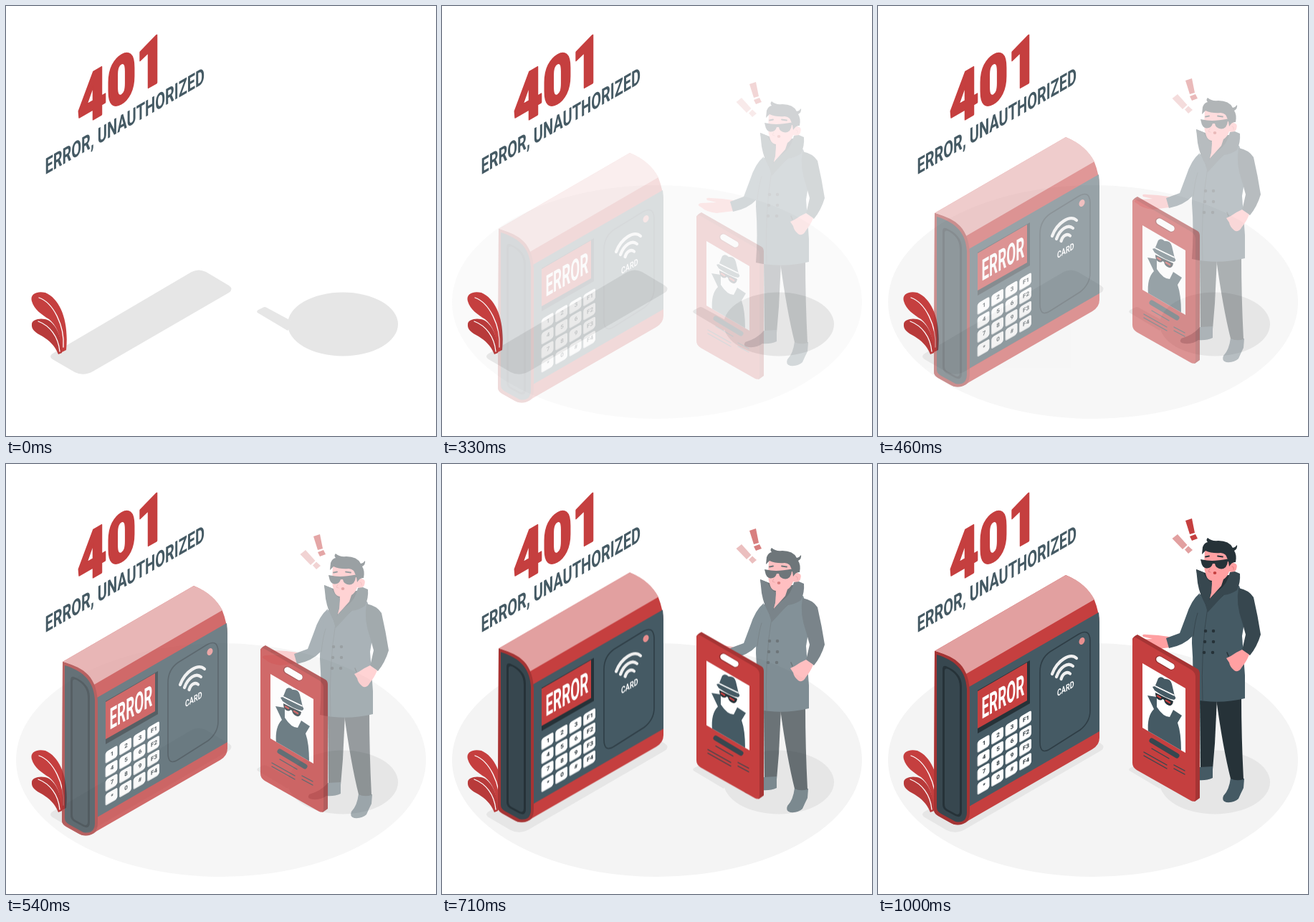
These frames come from a looping animation (600x600 px, 1.04 s). An HTML page without scripts:

```html
<!DOCTYPE html>
<html lang="en">
<head>
<meta charset="utf-8">
<title>401</title>
<style>
html, body { margin: 0; width: 100%; height: 100%; overflow: hidden; background: #fff; }
svg { display: block; width: 100%; height: 100%; }
text { font-family: Roboto, Inter, sans-serif; font-weight: 700; }
.red { fill: #c53f3f; }
.deep { fill: #a53434; }
.pink { fill: #e2a0a0; }
.slate { fill: #455a64; }
.dark { fill: #37474f; }
.ink { fill: #263238; }
.skin { fill: #ffa0a2; }
.white { fill: #fff; }
.shade { fill: #e6e6e6; }
.line { fill: none; stroke-linecap: round; }

/* stepped at 24 drawings a second */
.rise, .man, .floor { animation: rise 1040ms infinite; }
.man { animation-name: man; }
.floor { animation-name: floor; }
@keyframes rise {
  0% { opacity: 0; transform: translateY(60px); animation-timing-function: step-end; }
  16.3% { opacity: .02; transform: translateY(59px); animation-timing-function: steps(2); }
  24% { opacity: .07; transform: translateY(56px); animation-timing-function: steps(2); }
  31.7% { opacity: .18; transform: translateY(50px); animation-timing-function: steps(3); }
  44.2% { opacity: .54; transform: translateY(28px); animation-timing-function: steps(2); }
  51.9% { opacity: .77; transform: translateY(15px); animation-timing-function: steps(2); }
  60.5% { opacity: .95; transform: translateY(3.5px); animation-timing-function: steps(2); }
  68.2% { opacity: 1; transform: translateY(-3.5px); animation-timing-function: steps(3); }
  79.8% { opacity: 1; transform: translateY(-6.5px); animation-timing-function: steps(2); }
  88.4% { opacity: 1; transform: translateY(-4.5px); animation-timing-function: steps(2); }
  96.1%, 100% { opacity: 1; transform: none; }
}
@keyframes man {
  0% { opacity: 0; transform: translateY(40px); animation-timing-function: step-end; }
  16.3% { opacity: .06; transform: translateY(36px); animation-timing-function: steps(4); }
  31.7% { opacity: .21; transform: translateY(30px); animation-timing-function: steps(3); }
  44.2% { opacity: .36; transform: translateY(25px); animation-timing-function: steps(2); }
  51.9% { opacity: .46; transform: translateY(22px); animation-timing-function: steps(2); }
  60.5% { opacity: .56; transform: translateY(18px); animation-timing-function: steps(5); }
  79.8% { opacity: .82; transform: translateY(8px); animation-timing-function: steps(4); }
  96.1%, 100% { opacity: 1; transform: none; }
}
@keyframes floor {
  0% { opacity: 0; animation-timing-function: step-end; }
  16.3% { opacity: .1; animation-timing-function: steps(4); }
  31.7% { opacity: .45; animation-timing-function: steps(3); }
  44.2% { opacity: .75; animation-timing-function: steps(4); }
  60.5%, 100% { opacity: 1; }
}
</style>
</head>
<body>
<svg viewBox="0 0 600 600">
<defs>
  <g id="key">
    <rect x="-9" y="-6.8" width="16" height="15.500" rx="2.500" fill="#d5d9db"/>
    <rect x="-8" y="-7.500" width="16" height="15" rx="2.500" class="white"/>
  </g>
  <g id="row">
    <use href="#key"/><use href="#key" x="19.5"/><use href="#key" x="39"/><use href="#key" x="58.5"/>
  </g>
  <clipPath id="photo"><path d="M369 278L429 313V403L369 368Z"/></clipPath>
</defs>

<ellipse class="floor" cx="300" cy="413" rx="286" ry="163" fill="#f4f4f4"/>
<g class="shade">
  <path d="M259 371Q269 366 279 371L311 390Q318 395 311 400L121 510Q108 517 96 511L65 493Q59 489 65 485Z"/>
  <ellipse cx="470" cy="444" rx="77" ry="44.5"/>
  <path d="M352 424L358 421Q361 419 364 421L401 441L393 453L351 428Q349 426 352 424Z"/>
</g>

<g class="red">
  <text transform="matrix(.76 -.4385 0 1 99.500 171)" font-size="93" style="font-weight:900" stroke="#c53f3f" stroke-width="2.500" stroke-linejoin="round">401</text>
  <path d="M36 412C33 402 43 397 55 400C76 409 88 440 84 480L76 484C78 462 71 446 60 437C50 431 39 423 36 412Z"/>
  <path d="M36 444C36 437 50 434 60 439C73 448 78 466 78 484L73 486C68 473 60 467 51 461C41 456 35 451 36 444Z" fill="#b83a3a"/>
</g>
<g class="line" stroke="#fff" stroke-width="1.3">
  <path d="M46 407C66 414 82 446 80 476"/>
  <path d="M45 440C61 446 73 461 75 482"/>
</g>
<text class="slate" transform="matrix(.646 -.373 0 1 54.5 235.5)" font-size="31" style="font-weight:600">ERROR, UNAUTHORIZED</text>

<g class="man">
  <path class="red" d="M429 79L438 76L442 96L435 98ZM435 101L443 98L446 104L438 107Z"/>
  <path class="pink" d="M410.500 104L418 98L431.500 113L425 119ZM428 119.500L433 114.500L439 120L433 125Z"/>

  <path class="ink" d="M449 326L473 328L470 390L467 426H450Z"/>
  <path class="slate" d="M449 423L467 422V438Q458 442 447 441Q440 447 428 446Q419 445 423 439Q440 434 449 423Z"/>
  <path class="slate" d="M492 438L511 439L510 452Q506 460 503 467Q497 473 486 472Q479 470 482 463Q490 455 492 438Z"/>
  <path class="ink" d="M472 328L507 326Q507 380 510 440Q500 443 492 439Q481 395 472 328Z"/>

  <path class="skin" d="M406 241L391 239L375 238Q367 237 370 241L383 244L361 245Q354 247 362 251Q368 257 383 259L407 256Z"/>
  <path class="slate" d="M449 180Q437 190 430 212L421 236L402 243L406 257Q427 253 439 240L446 222Z"/>
  <path class="slate" d="M449 182L482 174L504 170Q516 200 508 240L512 295V327Q475 336 438 328Q441 290 438 250Q438 208 449 182Z"/>
  <path class="line" d="M460 200Q450 260 453 330M440 240Q442 220 446 208" stroke="#37474f" stroke-width="1"/>
  <g class="line" stroke="#263238" stroke-width="4.500">
    <path d="M457 233h.01M468 233h.01M456 248h.01M468 248h.01M455 263h.01M467 263h.01"/>
  </g>
  <path class="ink" d="M444 147L454 151L466 155H488L505 153L488 178L460 203L450 180Z"/>
  <path class="skin" d="M456 120H490L496 138Q503 139 500 147Q497 153 490 150Q488 157 482 161L479 170L463 188L466 163Q460 162 458 156Q455 148 455 140Z"/>
  <path class="dark" d="M444 147L454 151Q458 161 466 166L465 180L459 199Q449 184 446 166Z"/>
  <path class="dark" d="M491 151L498 150L505 153Q506 165 501 176Q492 182 482 183L460 207L457 197Q466 182 477 175Q488 166 491 151Z"/>
  <path class="ink" d="M452 126L453 116Q455 110 460 109Q457 106 460 103Q465 108 475 107Q490 107 495 117Q499 116 501 113Q502 118 497 121Q501 127 499 137Q494 136 490 143Q489 134 487 131Q486 125 478 124Q466 125 457 121Z"/>
  <path class="ink" d="M450 133L459 134.500Q470 136 488 132.500L496 135V137L488 136Q487 146 479 146.500Q471 146 470 139H467Q465 146 458 145.500Q452 144 451 137Z"/>
  <path class="line" d="M457 129.500L462 128.500M474 128.500L481 129.500" stroke="#263238" stroke-width="1.800"/>
  <ellipse cx="470" cy="152" rx="2.300" ry="1.900" class="red"/>
  <path class="line" d="M494 143Q497 143 496 147M463 146L461 150L464 151" stroke="#e47c80" stroke-width="1"/>

  <path class="dark" d="M503 173Q518 176 524 186Q530 212 534 238Q529 255 519 267L508 260L513 238L508 220Q499 195 503 173Z"/>
  <path class="skin" d="M508 259L518 266Q514 276 508 283Q503 292 497 288Q491 283 490 277L486 271Q493 268 500 263Z"/>
  <path class="line" d="M487 263L489 268" stroke="#263238" stroke-width="1.500"/>
</g>

<g class="rise">
  <!-- terminal -->
  <path class="red" d="M79 261L262 155C282 163 295 176 302 190Q308 205 309 222V382Q309 392 299 398L127 497Q113 508 100 500L84 491Q78 488 78 482Z"/>
  <path class="pink" d="M79 261L262 155C282 163 294 174 302 189L121 294C116 276 100 268 79 261Z"/>
  <path class="slate" d="M127 311L308 207Q309 215 309 222V373L127 478Z"/>
  <path class="deep" d="M79 261C102 268 126 276 128 316V486Q128 499 119 502Q109 506 100 500L84 491Q78 488 78 482Z"/>
  <path class="dark" d="M82 266C104 273 122 284 124 314V487Q123 502 108 499L88 488Q82 485 82 479Z"/>
  <path class="ink" d="M90 287Q90 279 97 283C108 288 117 296 117 310V485Q117 495 108 491L95 484Q90 481 90 475Z"/>
  <path class="dark" d="M93 289Q93 284 98 286C107 291 114 298 114 311V484Q114 491 108 488L97 482Q93 480 93 475Z"/>

  <path class="ink" d="M139 316L212 274V334L139 376Z"/>
  <path class="red" d="M139 317L208 277V330L139 369Z"/>
  <text class="white" transform="matrix(.46 -.265 0 1 144.500 356)" font-size="41">ERROR</text>

  <g transform="matrix(1 -.577 0 1 147.500 389.500)" font-size="8" text-anchor="middle">
    <use href="#row"/><use href="#row" y="19.600"/><use href="#row" y="39.200"/><use href="#row" y="58.800"/>
    <g class="ink" transform="translate(.5 2.700)">
      <text x="0 19.5 39">123</text><text x="58.500">F1</text>
      <text x="0 19.5 39" y="19.600">456</text><text x="58.500" y="19.600">F2</text>
      <text x="0 19.5 39" y="39.200">789</text><text x="58.500" y="39.200">F3</text>
      <text x="0 19.5 39" y="58.800">*0#</text><text x="58.500" y="58.800">F4</text>
    </g>
  </g>

  <path class="line" d="M226 290Q226 272 240 262L279 238Q295 228 296 246V344Q296 360 282 371L241 397Q226 407 226 388Z" stroke="#2f3e46" stroke-width="1.600"/>
  <ellipse cx="284.500" cy="247" rx="3.700" ry="5.300" fill="#e88f8f" transform="rotate(25 284.500 247)"/>
  <g class="line" stroke="#f0f0f0" stroke-width="4.200">
    <path d="M243 293C250 274 268 263 277 271"/>
    <path d="M249 297C254 283 265 276 272 282"/>
    <path d="M255.500 300C258 292 264 289 268 292.500"/>
  </g>
  <text class="white" transform="matrix(.69 -.398 0 1 250 324.500)" font-size="13">CARD</text>

  <!-- badge -->
  <path class="deep" d="M355 244Q356 241 362 238L446 286Q449 288 449 293V466L442 471L360 425Z"/>
  <path class="red" d="M355 247Q355 240 361 243L437 287Q443 291 443 297V465Q443 473 437 470L361 427Q355 423 355 417Z"/>
  <path class="line" d="M392 272.500L409 282.500" stroke="#8f2d2d" stroke-width="10.500"/>
  <path class="line" d="M392.500 272.500L409.500 282.500" stroke="#fff" stroke-width="8.500"/>
  <path class="white" d="M369 278L429 313V403L369 368Z"/>
  <g clip-path="url(#photo)" class="slate">
    <path d="M376 323L389 325L389 339Q398 353 407 353L412 343L424 351L418 361Q423 375 423 400L377 374Q375 352 385 342Z"/>
    <path d="M387 309L391 299Q395 295 400 300Q408 299 410 307L414 324Z"/>
    <path d="M383 311Q386 309 390 312L414 324Q417 327 413 329Q403 328 386 316Z"/>
    <path class="line" d="M388 310.500L413 322.500" stroke="#fff" stroke-width="1.500"/>
    <path class="ink" d="M387 319L399 325L412 331Q411 338 406 337Q400 335 399 329L397 328Q395 331 390 328Q387 325 387 319Z"/>
    <path class="line" d="M390 323.500L394 326M402 330L407 333" stroke="#c53f3f" stroke-width="2.500"/>
  </g>
  <g class="line" stroke="#37474f">
    <path d="M382 386L417 407" stroke-width="7"/>
    <path d="M382 397L406 411M371 402L403 420M371 407L403 425M413 420L428 428M413 425L428 433" stroke-width="1.400"/>
  </g>
</g>
</svg>
</body>
</html>
```
